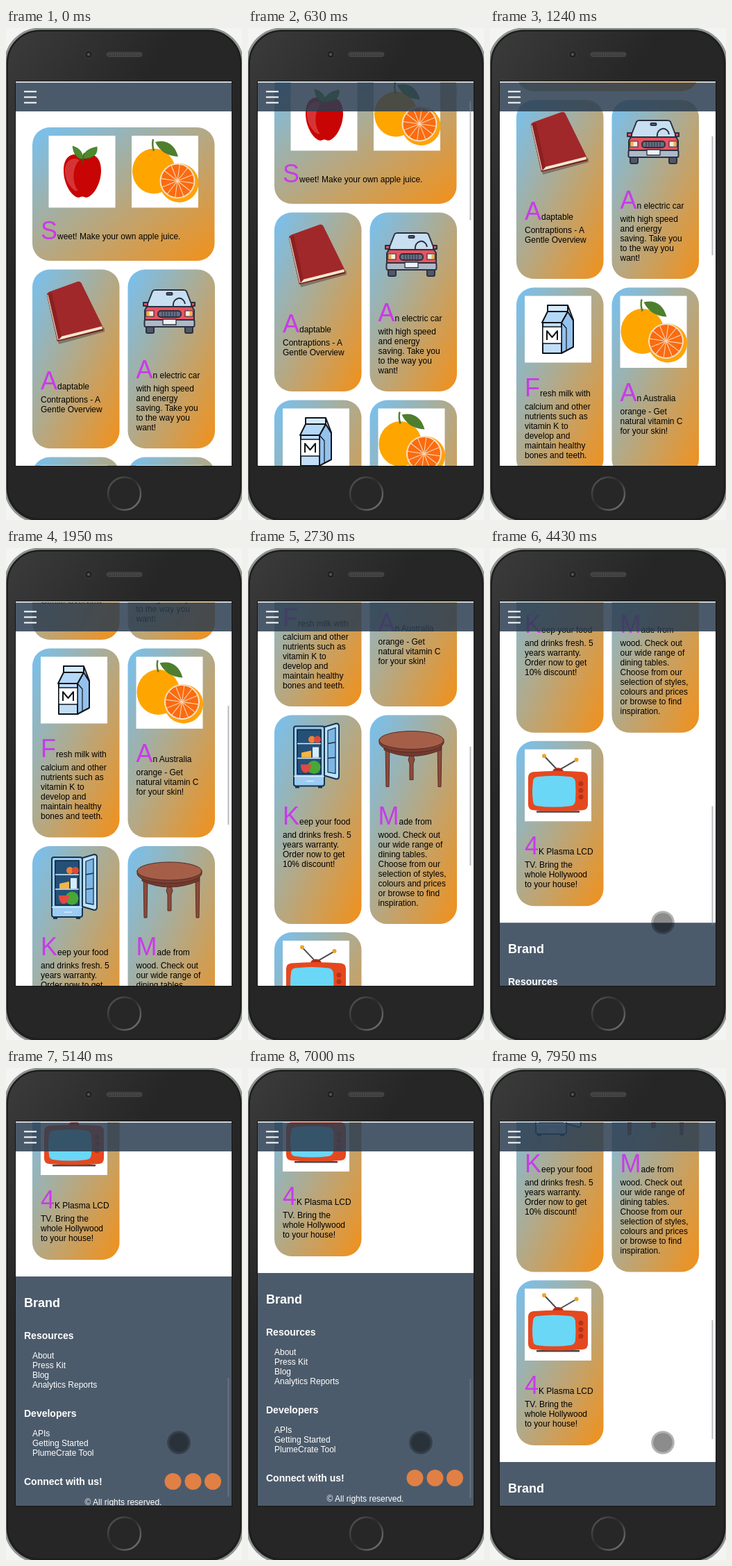
An HTML page for the animation above (8 s loop, 340x708 px).

```html
<!DOCTYPE html>
<html lang="en">
<head>
<meta charset="utf-8">
<title>Phone shop page</title>
<style>
html, body { margin: 0; width: 100%; height: 100%; overflow: hidden; background: #f4f5f2; }
svg { display: block; width: 340px; height: 708px; }
text { font: 12px "Liberation Sans", Arial, sans-serif; white-space: pre; }
.cap { font-size: 36px; fill: #c93aea; }
.light text { fill: #fff; }
.head { font-weight: bold; font-size: 14px; }
.brand { font-weight: bold; font-size: 18px; }
</style>
</head>
<body>
<svg viewBox="0 0 340 708">
  <defs>
    <linearGradient id="card" x1="0" y1="0" x2="1" y2="1">
      <stop offset="0" stop-color="#76c1f2"/><stop offset="1" stop-color="#f29019"/>
    </linearGradient>
    <linearGradient id="body" x1="0" y1="0" x2=".25" y2=".35">
      <stop offset="0" stop-color="#3c3c3c"/><stop offset="1" stop-color="#262626"/>
    </linearGradient>
    <linearGradient id="ring" x1="0" y1="0" x2="1" y2="1">
      <stop offset="0" stop-color="#5c5c5c"/><stop offset=".45" stop-color="#2c2c2c"/><stop offset="1" stop-color="#808080"/>
    </linearGradient>
    <pattern id="mesh" width="3" height="3" patternUnits="userSpaceOnUse">
      <rect width="3" height="3" fill="#3a3a3a"/><circle cx="1.5" cy="1.5" r=".8" fill="#606060"/>
    </pattern>
    <clipPath id="screen"><rect x="14" y="77.5" width="311" height="552.5"/></clipPath>

    <g id="apple">
      <rect x="61.5" y="155" width="96" height="103.5" fill="#fff"/>
      <path d="M110 187C118 178 137 180 137 205C137 226 124 244 115 244Q110 241 105 244C96 244 83 226 83 205C83 180 102 178 110 187Z" fill="#c80404"/>
      <path d="M92 190C83 195 83 212 90 224C96 233 101 236 104 234C95 224 95 200 106 190Q98 186 92 190Z" fill="#d63434"/>
      <path d="M110 194Q111 184 113 180" fill="none" stroke="#70401c" stroke-width="2"/>
      <path d="M111 189Q98 188 96 170Q111 174 111 189ZM111 188Q111 175 131 171Q133 188 111 188Z" fill="#4c8b2b" stroke="#326a1c" stroke-width=".7"/>
    </g>

    <g id="orange">
      <rect x="181" y="155" width="96" height="103.5" fill="#fff"/>
      <ellipse cx="213" cy="206" rx="31" ry="32.5" fill="#ffa500"/>
      <path d="M213 177Q210 168 212 160" fill="none" stroke="#55802d" stroke-width="2.5"/>
      <path d="M215 164C232 160 243 168 248 185C232 184 222 178 215 164Z" fill="#4d7f2e"/>
      <circle cx="249.5" cy="223" r="28" fill="#ffa30b"/>
      <circle cx="247" cy="220" r="25.5" fill="#f6dfc4"/>
      <circle cx="247" cy="220" r="23.5" fill="#fc6b10"/>
      <g id="spokes" stroke="#f8d5b3" stroke-width="1.1"></g>
    </g>

    <g id="book">
      <path d="M62 389L76 455L142 437V432Z" fill="#5d4a3c" opacity=".55"/>
      <path d="M59 384L74 451L140 435L139 429L80 444Z" fill="#741a1c"/>
      <path d="M63 386L76 449L139 433L138 428L80 441Z" fill="#f4e7cd"/>
      <path d="M59 383Q60 380 64 379L103 365Q107 364 109 368L139 429L79 444L74 448Z" fill="#a0282a"/>
      <path d="M59 384L74 451L80 444L66 380Z" fill="#8b2022"/>
      <path d="M60 384L75 449" stroke="#e5cfb0" stroke-width="1.3"/>
    </g>

    <g id="car" stroke="#2c3040" stroke-width="2" stroke-linejoin="round">
      <path d="M202 429h11v8q0 2-2 2h-7q-2 0-2-2ZM258 429h11v8q0 2-2 2h-7q-2 0-2-2Z" fill="#505868"/>
      <path d="M211 379Q212 377 215 377H256Q259 377 260 379L269 402H202Z" fill="#c7dff0"/>
      <path d="M241 400a8 9 0 0 1 17 -3" fill="none"/>
      <rect x="231.5" y="381" width="8" height="3" rx="1" fill="#667689"/>
      <path d="M198 395h6v5h-6ZM267 395h5v5h-5Z" fill="#e85460"/>
      <path d="M203 401H268L271 406V422H200V406Z" fill="#e85460"/>
      <rect x="219" y="407" width="33" height="9" rx="4" fill="#667082"/>
      <path d="M225 408v7m4 -7v7m4 -7v7m4 -7v7m4 -7v7m4 -7v7" stroke-width="1"/>
      <path d="M202 407h11v8h-11ZM258 407h11v8h-11Z" fill="#f7edda" stroke-width="1.2"/>
      <path d="M202.5 408h4v6h-4ZM264.500 408h4v6h-4Z" fill="#f2b33e" stroke="none"/>
      <rect x="199.500" y="420" width="72" height="10" rx="2" fill="#adb9c7"/>
      <rect x="226" y="419" width="19" height="8" fill="#eef2f5" stroke-width="1.300"/>
    </g>

    <g id="milk" stroke="#10151c" stroke-width="2" stroke-linejoin="round">
      <rect x="50" y="629.5" width="96" height="96" fill="#fff" stroke="none"/>
      <path d="M103 668L112 652L120 665V703L103 712Z" fill="#94c2ed"/>
      <path d="M75 668L83 652H112L103 668Z" fill="#b4d8f7"/>
      <path d="M83 643H112V652H83Z" fill="#d4eafc"/>
      <path d="M112 643L120 664V703" fill="none"/>
      <path d="M103 668L110 676V708" fill="none" stroke-width="1.200"/>
      <rect x="76" y="668" width="27" height="44" fill="#c0def8"/>
      <rect x="76" y="674" width="27" height="24" fill="#fff" stroke-width="1.300"/>
      <path d="M82 693V680L89.500 689L97 680V693" fill="none"/>
    </g>

    <g id="fridge" stroke="#17344f" stroke-width="2" stroke-linejoin="round">
      <rect x="66" y="918" width="44" height="86" rx="3" fill="#9cccf2"/>
      <path d="M68 1004h6v3h-6ZM101 1004h6v3h-6Z" fill="#17344f" stroke="none"/>
      <rect x="71" y="923" width="34" height="64" fill="#245078"/>
      <path d="M71 943H105M71 964H105M66 990H110M84 997H95" stroke="#d7edfb" stroke-width="1.500"/>
      <path d="M110 919L127 914Q131 914 131 918V990Q131 994 127 994L110 989Z" fill="#bfe1fa"/>
      <path d="M115 924L126 920V986L115 984Z" fill="#7db7e4" stroke-width="1.300"/>
      <path d="M115 943L126 941M115 964L126 963" stroke-width="1.500"/>
      <g stroke="none">
        <circle cx="92" cy="937" r="5" fill="#ef8035"/><circle cx="100" cy="937" r="5" fill="#dc4938"/>
        <path d="M77 956l14-3v10H77Z" fill="#f6b444"/><path d="M93 948h9v15h-9Z" fill="#d6edfa"/>
        <circle cx="95" cy="977" r="9.500" fill="#46a936"/>
        <path d="M76 973H91Q90 985 82 985Q76 983 76 973Z" fill="#e04a40"/>
      </g>
    </g>

    <g id="table" stroke="#512c25" stroke-width="1">
      <path d="M198 942h6l-1 63h-4ZM273 942h6l-1 63h-4Z" fill="#8c4b3b"/>
      <path d="M232 952h7l-1 8 2 6-2 6v23h-5v-23l-2-6 2-6Z" fill="#8c4b3b"/>
      <path d="M196 943Q235 966 278 943V952Q235 970 196 952Z" fill="#74392d"/>
      <path d="M189 937v5c4 18 88 18 93 0v-5Z" fill="#7d4032"/>
      <ellipse cx="235.500" cy="938" rx="46.500" ry="13" fill="#a55f48"/>
    </g>

    <g id="tv">
      <rect x="50" y="1226.500" width="96" height="103.500" fill="#fff"/>
      <path d="M98 1257L78 1236M98 1257L124 1242" stroke="#4a4a4a" stroke-width="2"/>
      <g fill="#efa229"><circle cx="78" cy="1236" r="3"/><circle cx="124.500" cy="1241.500" r="3"/></g>
      <path d="M90 1259a8 6 0 0 1 16 0Z" fill="#b02d1b"/>
      <rect x="67" y="1315" width="62" height="2.500" fill="#454545"/>
      <path d="M62 1259Q98 1256 134 1259Q141 1260 141 1267V1306Q141 1313 134 1314Q98 1317 62 1314Q55 1313 55 1306V1267Q55 1260 62 1259Z" fill="#e5481f"/>
      <path d="M68 1266Q92 1263 116 1266Q122 1267 123 1273Q124 1287 123 1301Q122 1307 116 1308Q92 1311 68 1308Q62 1307 62 1301Q60 1287 62 1273Q62 1267 68 1266Z" fill="#6ad7f7"/>
      <g fill="#b63319"><circle cx="131" cy="1276" r="3.500"/><circle cx="131" cy="1285.500" r="3.500"/><circle cx="131" cy="1295" r="3.500"/></g>
    </g>
  </defs>

  <rect x="-1" y="1" width="342" height="710" rx="50" fill="url(#body)" stroke="#8f9590" stroke-width="3"/>
  <rect x="2" y="4" width="336" height="703" rx="47" fill="none" stroke="#1c1c1c" stroke-width="2"/>
  <circle cx="119" cy="38" r="5.500" fill="#222" stroke="#3c3c3c"/>
  <circle cx="119" cy="38" r="2" fill="#55585e"/>
  <rect x="145" y="35" width="51" height="6" rx="3" fill="url(#mesh)" stroke="#4a4a4a"/>
  <circle cx="170.500" cy="670" r="23.500" fill="#272727" stroke="url(#ring)" stroke-width="2.500"/>
  <rect x="13.500" y="77" width="312" height="553.500" fill="#fff" stroke="#151515"/>

  <g clip-path="url(#screen)">
    <rect x="14" y="77" width="311" height="553" fill="#fff"/>
    <g id="page"></g>
    <rect x="14" y="78.500" width="311" height="41.500" fill="#2c3e50" fill-opacity=".85"/>
    <path d="M26 91.500H44M26 99.500H44M26 107.500H44" stroke="#fff" stroke-width="2"/>
    <rect id="thumb" x="319.500" width="1.800" height="171" fill="#83838f"/>
    <g id="touch">
      <circle cx="249" cy="539" r="16.800" fill-opacity=".3"/>
      <circle cx="249" cy="539" r="13.800" fill-opacity=".21"/>
    </g>
  </g>
  <path d="M14 77.500H325" stroke="#fff"/>
</svg>
<script>
const $ = id => document.getElementById(id);
const L = 50, R = 187.5;
const text = (x, y, s, cls = '', extra = '') => `<text x="${x}" y="${y}" class="${cls}" ${extra}>${s}</text>`;
const use = (id, x = 0, y = 0) => `<use href="#${id}" x="${x}" y="${y}"/>`;

// Card with a large first letter; later lines sit below the first one.
function card(x, top, bottom, base, capWidth, lines, width = 125.5) {
  const [first, ...rest] = lines;
  return `<rect x="${x - 12}" y="${top}" width="${width}" height="${bottom - top}" rx="25" fill="url(#card)"/>` +
    text(x, base, first[0], 'cap') + text(x + capWidth, base, first.slice(1)) +
    rest.map((s, i) => text(x, base + 19 + 14 * i, s)).join('');
}

const list = (y, items) => items.map((s, i) => text(38, y + 14 * i, s)).join('');

$('spokes').innerHTML = Array.from({ length: 12 }, (_, i) =>
  `<path d="M247 220h24" transform="rotate(${i * 30 + 8} 247 220)"/>`).join('');

$('page').innerHTML =
  card(L, 143, 335, 304, 24, ['Sweet! Make your own apple juice.'], 262.5) +
  card(L, 347.5, 605, 520, 24, ['Adaptable', 'Contraptions - A', 'Gentle Overview']) +
  card(R, 347.5, 605, 504, 24, ['An electric car', 'with high speed', 'and energy', 'saving. Take you', 'to the way you', 'want!']) +
  card(L, 617.5, 889.5, 774, 22, ['Fresh milk with', 'calcium and other', 'nutrients such as', 'vitamin K to', 'develop and', 'maintain healthy', 'bones and teeth.']) +
  card(R, 617.5, 889.5, 781, 24, ['An Australia', 'orange - Get', 'natural vitamin C', 'for your skin!']) +
  card(L, 902, 1202.5, 1059, 24, ['Keep your food', 'and drinks fresh. 5', 'years warranty.', 'Order now to get', '10% discount!']) +
  card(R, 902, 1202.5, 1059, 30, ['Made from', 'wood. Check out', 'our wide range of', 'dining tables.', 'Choose from our', 'selection of styles,', 'colours and prices', 'or browse to find', 'inspiration.']) +
  card(L, 1214.5, 1452, 1378, 20, ['4K Plasma LCD', 'TV. Bring the', 'whole Hollywood', 'to your house!']) +
  ['apple', 'orange', 'book', 'car', 'milk', 'fridge', 'table', 'tv'].map(id => use(id)).join('') +
  use('orange', 6.5, 474.5) +
  '<g class="light"><rect x="14" y="1476" width="311" height="340" fill="#4c5b6b"/>' +
  text(26, 1520, 'Brand', 'brand') +
  text(26, 1566, 'Resources', 'head') +
  list(1594, ['About', 'Press Kit', 'Blog', 'Analytics Reports']) +
  text(26, 1678, 'Developers', 'head') +
  list(1706, ['APIs', 'Getting Started', 'PlumeCrate Tool']) +
  text(26, 1776, 'Connect with us!', 'head') +
  text(169, 1805, '© All rights reserved.', '', 'text-anchor="middle"') +
  [240.5, 269.5, 298].map(x => `<circle cx="${x}" cy="1771" r="12" fill="#e08045"/>`).join('') + '</g>';

// Wheel scrolls: first step, last step, step count, end position.
const smooth = p => p * p * (3 - 2 * p), linear = p => p;
const scrolls = [
  [400, 630, 4, 82, smooth],
  [860, 1240, 6, 244, smooth],
  [1410, 1950, 8, 473, linear],
  [2027, 2180, 3, 571, linear],
  [2260, 2410, 3, 653, smooth],
  [2660, 2960, 5, 734, smooth],
  [3270, 3580, 5, 816, smooth],
  [4190, 4590, 6, 979, smooth],
  [4740, 5140, 6, 1176, linear],
  [5220, 5380, 3, 1181, smooth],
  [7080, 7400, 5, 1018, smooth],
  [7550, 7950, 6, 909, linear]
];

function scrollAt(t) {
  let pos = 0;
  for (const [start, end, n, to, ease] of scrolls) {
    if (t < start) break;
    const k = Math.min(n, Math.floor((t - start) / (end - start) * (n - 1) + 1.01));
    pos += (to - pos) * ease(k / n);
  }
  return pos;
}

function thumbAlpha(t) {
  const steps = [[7000, .6], [5920, 0], [5690, .3], [4190, .6], [4040, 0], [3965, .2], [3890, .4], [400, .6], [0, 0]];
  return steps.find(s => t >= s[0])[1];
}

function draw(t) {
  const pos = scrollAt(t);
  $('page').setAttribute('transform', `translate(0 ${-pos})`);
  $('thumb').setAttribute('y', 80 + pos * .3112);
  $('thumb').setAttribute('opacity', thumbAlpha(t));
  $('touch').setAttribute('opacity', t >= 3965 ? 1 : 0);
}

const began = performance.now();
function tick() {
  draw((performance.now() - began) % 8000);
  requestAnimationFrame(tick);
}
tick();
</script>
</body>
</html>
```
